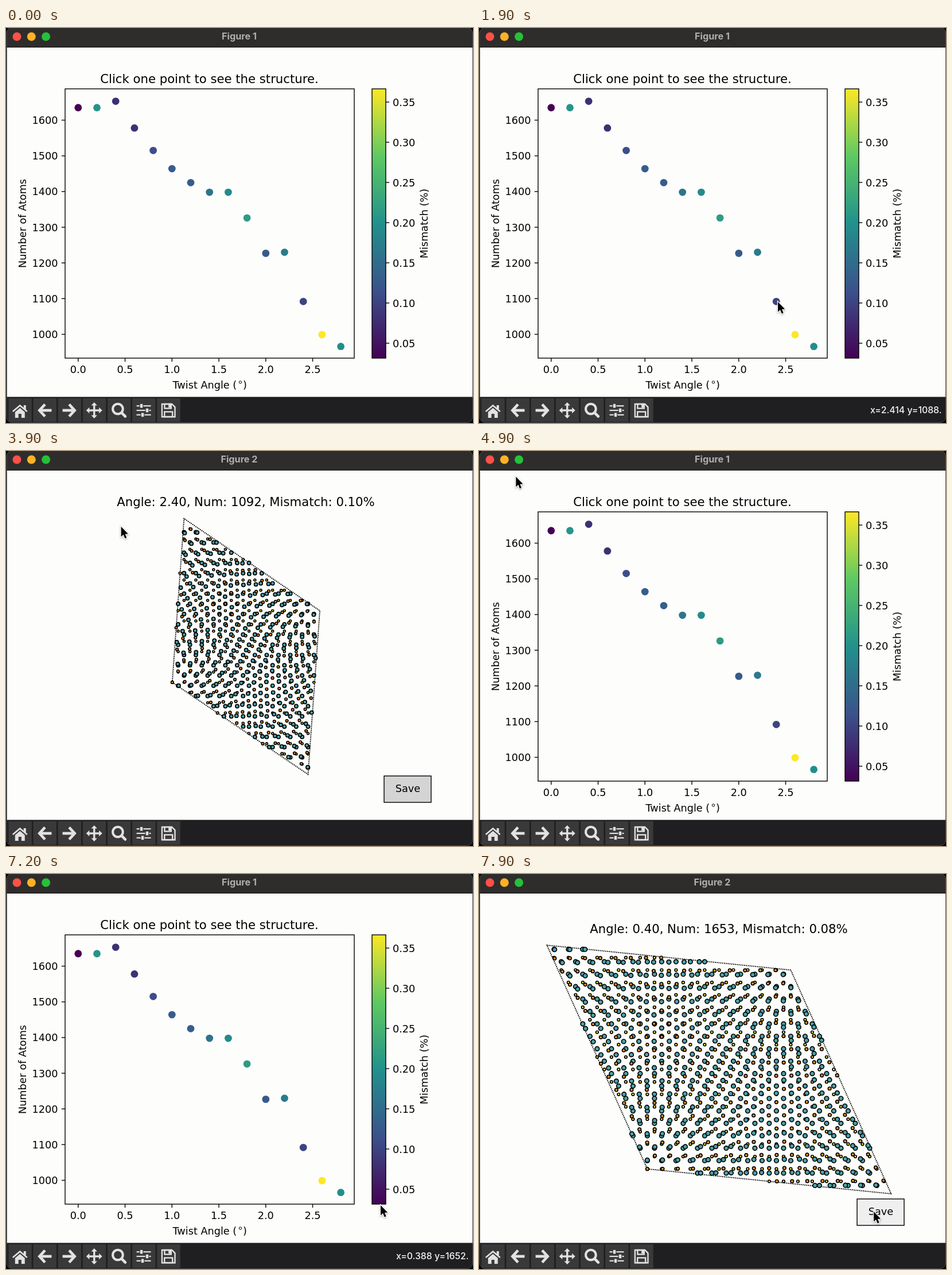
Write an HTML page with a canvas that moves like this. It is 814 by 688 pixels and loops after 8000 ms.

```html
<!DOCTYPE html>
<html lang="en">
<head>
<meta charset="utf-8">
<title>Twist angle explorer</title>
<style>
html, body { margin: 0; width: 100%; height: 100%; overflow: hidden; background: #000; }
canvas { display: block; }
</style>
</head>
<body>
<canvas id="stage" width="814" height="688"></canvas>
<script>
const ctx = document.getElementById('stage').getContext('2d');
const LOOP = 8000, TAU = 2 * Math.PI;
const PLOT = '"DejaVu Sans", sans-serif', UI = 'Inter, sans-serif';
const PT = 1.766, SMALL = 10 * PT, LARGE = 12 * PT;
const BOX = { x: 103, y: 106, w: 504, h: 469 };
const BAR = { x: 638, y: 106, w: 24, h: 469 };
const SAVE = { x: 659, y: 566, w: 82, h: 46 };
const ICON_COLOR = '#e2e2e2', BUTTON_COLOR = '#3a393a';

// Chart data, one value per 0.2 degrees
const ATOMS = [1635, 1635, 1653, 1578, 1515, 1464, 1425, 1398, 1398, 1326, 1227, 1230, 1092, 999, 966];
const MISMATCH = [.03, .205, .08, .08, .11, .13, .13, .16, .19, .215, .125, .17, .1, .367, .195];

// Cursor moves: start, end, destination; it rests in between
const MOVES = [[300, 1000, 520, 475], [2900, 3900, 200, 130], [3900, 4400, 16, 12], [4750, 5300, 188.7, 124.2],
  [5600, 6100, 452, 285], [6100, 6900, 652, 575], [7550, 7900, 687, 586]];

const lerp = (a, b, f) => a + (b - a) * f;
const clamp = f => Math.max(0, Math.min(1, f));
const within = (b, x, y) => x > b.x && x < b.x + b.w && y > b.y && y < b.y + b.h;
const xPix = v => 125.8 + 163.5 * v;
const yPix = n => 160.5 + (1600 - n) * .6217;

const SCALE = ['#440154', '#3b528b', '#21918c', '#5ec962', '#fde725'];
function scaleColor(f) {
  const s = clamp(f) * 4, i = Math.min(3, Math.floor(s));
  const channel = (hex, k) => parseInt(hex.slice(1 + 2 * k, 3 + 2 * k), 16);
  return `rgb(${[0, 1, 2].map(k => Math.round(lerp(channel(SCALE[i], k), channel(SCALE[i + 1], k), s - i)))})`;
}

// Two hexagonal layers sharing one supercell; each layer spans it with indices (m, n).
function makeCell(index, a, layers, titleY) {
  const [m, n] = layers[0], h = Math.sqrt(3) / 2;
  const A = [(m + n / 2) * a, n * h * a];
  const B = [-A[0] / 2 + A[1] * h, -A[0] * h - A[1] / 2];
  const at = (u, v) => [418.4, 340.5].map((c, k) => c + (u - .5) * A[k] + (v - .5) * B[k]);
  const inside = f => f > -1e-6 && f < 1 - 1e-6;
  const dots = [];
  layers.forEach(([m, n], layer) => {
    const N = m * m + m * n + n * n;
    for (const metal of [true, false]) {
      const size = metal ? .15 : layer ? .11 : .092;
      const color = metal ? '#4aa3a8' : layer ? '#f59a1e' : '#f4f43e';
      const shift = metal ? 1 / 3 : 0;
      for (let i = -40; i <= 40; i++) for (let j = -40; j <= 40; j++) {
        const p = i + shift, q = j + shift;
        const u = (p * (m + n) + q * n) / N, v = (p * n - q * m) / N;
        if (inside(u) && inside(v)) dots.push([...at(u, v), size * a, color]);
      }
    }
  });
  const title = `Angle: ${(index / 5).toFixed(2)}, Num: ${ATOMS[index]}, Mismatch: ${MISMATCH[index].toFixed(2)}%`;
  return { corners: [at(0, 0), at(1, 0), at(1, 1), at(0, 1)], dots, title, titleY };
}

const CELLS = [
  makeCell(12, 20.58, [[7, 9], [6, 9]], 96),
  makeCell(2, 25, [[16, 2], [15, 2]], 103)
];

function text(str, x, y, size, align = 'center', color = '#000', family = PLOT, weight = 400) {
  ctx.font = `${weight} ${size}px ${family}`;
  ctx.textAlign = align;
  ctx.fillStyle = color;
  ctx.fillText(str, x, Math.round(y));
}

function rect(x, y, w, h, color) {
  ctx.fillStyle = color;
  ctx.fillRect(x, y, w, h);
}

function frameRect({ x, y, w, h }, fill) {
  if (fill) rect(x, y, w, h, fill);
  ctx.lineWidth = 1.4;
  ctx.strokeRect(x, y, w, h);
}

function circle(x, y, r) {
  ctx.beginPath();
  ctx.arc(x, y, r, 0, TAU);
}

function disc(x, y, r, color) {
  circle(x, y, r);
  ctx.fillStyle = color;
  ctx.fill();
}

function ring(x, y, r, width) {
  circle(x, y, r);
  ctx.lineWidth = width;
  ctx.stroke();
}

function trace(points, closed) {
  ctx.beginPath();
  points.forEach(p => ctx.lineTo(...p));
  if (closed) ctx.closePath();
}

function line(width, ...points) {
  ctx.lineWidth = width;
  trace(points);
  ctx.stroke();
}

// Fills a shape given by its right half
function symmetric(...half) {
  trace([...half, ...half.map(([x, y]) => [-x, y]).reverse()], true);
  ctx.fill();
}

function upright(str, x, y) {
  ctx.save();
  ctx.translate(x, y);
  ctx.rotate(-TAU / 4);
  text(str, 0, 0, SMALL);
  ctx.restore();
}

// Toolbar icons, each around its own centre
function home() {
  line(2.6, [-12.5, 2], [0, -8.5], [12.5, 2]);
  ctx.fillRect(6.5, -9, 4, 7);
  symmetric([0, -4.3], [8.5, 3], [8.5, 13], [2.6, 13], [2.6, 6]);
}

const arrow = dir => () => {
  ctx.scale(dir, 1);
  line(4.8, [.5, -10.5], [-9, 0], [.5, 10.5]);
  line(4.8, [-8, 0], [12, 0]);
};

function move() {
  for (let i = 0; i < 4; i++) {
    line(3.4, [0, 0], [0, -10]);
    symmetric([0, -14], [5.2, -8.4]);
    ctx.rotate(TAU / 4);
  }
}

function zoom() {
  ring(-2, -2.5, 8.8, 4);
  ctx.lineCap = 'round';
  line(4.6, [5, 4.5], [11, 10.5]);
}

function sliders() {
  for (let i = -1; i <= 1; i++) {
    const x = i ? -3 + i : 6, y = i * 7.8;
    line(2.2, [-12.5, y], [12.5, y]);
    rect(x - 3.4, y - 3.6, 6.8, 7.2, BUTTON_COLOR);
    rect(x - 2.2, y - 3.3, 4.4, 6.6, ICON_COLOR);
  }
}

function floppy() {
  line(2.4, [-11.3, -11], [6, -11], [11.3, -5.7], [11.3, 11.2], [-11.3, 11.2], [-11.3, -12.2]);
  ctx.strokeRect(-6.8, -11, 11.4, 7.5);
  ctx.strokeRect(-7, 2.5, 14, 8.5);
  ctx.fillRect(0, -11, 4, 6);
}

const ICONS = [home, arrow(1), arrow(-1), move, zoom, sliders, floppy];

function drawWindow(title, dark) {
  rect(0, 0, 814, 688, '#000');
  ctx.beginPath();
  ctx.roundRect(1, -1, 812.5, 688.5, 10);
  ctx.save();
  ctx.clip();
  rect(0, 0, 814, 688, '#1f1e20');
  rect(0, 0, 814, 34, '#2e2d2c');
  rect(0, 33, 814, 1, '#111');
  if (!dark) rect(1.5, 34, 812, 608.5, '#fdfdfc');
  ctx.restore();
  ctx.lineWidth = 1;
  ctx.strokeStyle = '#4a494a';
  ctx.stroke();

  ['#ff5147', '#ffb224', '#25c138'].forEach((c, i) => disc(19 + 25.3 * i, 15, 7.5, c));
  text(title, 406.5, 20, 16.2, 'center', '#b0afaf', UI, 700);

  ICONS.forEach((icon, i) => {
    const x = 24.3 + 43.15 * i;
    rect(x - 20, 645, 40.5, 41, BUTTON_COLOR);
    ctx.save();
    ctx.translate(x, 666);
    ctx.fillStyle = ctx.strokeStyle = ICON_COLOR;
    icon();
    ctx.restore();
  });
}

function drawScatter() {
  text('Click one point to see the structure.', 354.5, 96, LARGE);
  ctx.strokeStyle = '#000';
  for (let n = 1000; n <= 1600; n += 100) {
    line(1.4, [BOX.x, yPix(n)], [BOX.x - 6.2, yPix(n)]);
    text(n, 90.5, yPix(n) + 6.6, SMALL, 'right');
  }
  for (let v = 0; v <= 2.5; v += .5) {
    const y = BOX.y + BOX.h;
    line(1.4, [xPix(v), y], [xPix(v), y + 6.2]);
    text(v.toFixed(1), xPix(v), 601, SMALL);
  }
  ATOMS.forEach((n, i) => disc(xPix(i / 5), yPix(n), 6.4, scaleColor((MISMATCH[i] - .031) / .336)));
  frameRect(BOX);

  text('Twist Angle (', 290.5, 628, SMALL, 'left');
  text(')', 420, 628, SMALL, 'right');
  ring(408.5, 617, 2.2, 1);
  upright('Number of Atoms', 35, 340.5);

  const fade = ctx.createLinearGradient(0, BAR.y + BAR.h, 0, BAR.y);
  SCALE.forEach((color, i) => fade.addColorStop(i / 4, color));
  frameRect(BAR, fade);
  for (let i = 1; i <= 7; i++) {
    const y = 619 - 70 * i;
    line(1.4, [662, y], [668.2, y]);
    text((i * .05).toFixed(2), 674, y + 6.6, SMALL, 'left');
  }
  upright('Mismatch (%)', 734.5, 340.5);
}

function drawCell(cell, hover) {
  text(cell.title, 418, cell.titleY, LARGE);
  ctx.strokeStyle = '#000';
  ctx.lineWidth = 1.8;
  ctx.setLineDash([1.8, 1.4]);
  trace(cell.corners, true);
  ctx.stroke();
  ctx.setLineDash([]);
  ctx.lineWidth = 1.7;
  for (const dot of cell.dots) {
    disc(...dot);
    ctx.stroke();
  }
  frameRect(SAVE, hover ? '#efefef' : '#d4d4d4');
  text('Save', 700.5, 594, SMALL);
}

function cursorAt(t) {
  if (t < MOVES[0][0]) return null;
  return MOVES.reduce(([x, y], [t0, t1, toX, toY]) => {
    const f = clamp((t - t0) / (t1 - t0));
    return [lerp(x, toX, f), lerp(y, toY, f)];
  }, [814, 560]);
}

function drawCursor([x, y]) {
  ctx.save();
  ctx.translate(x + 1, y + 2);
  trace([[0, 0], [0, 17.6], [4, 14], [6.7, 20.6], [9.7, 19.3], [7, 12.9], [12.2, 12.6]], true);
  ctx.shadowColor = 'rgba(0,0,0,.35)';
  ctx.shadowBlur = 3;
  ctx.shadowOffsetY = 1;
  ctx.lineWidth = 2.4;
  ctx.strokeStyle = '#fff';
  ctx.stroke();
  ctx.shadowColor = 'transparent';
  ctx.fillStyle = '#000';
  ctx.fill();
  ctx.restore();
}

// The readout freezes after the second click while the structure is computed.
function drawReadout(t) {
  const pos = cursorAt(Math.min(t, 5500));
  if (!pos) return;
  const x = pos[0] + .5, y = pos[1] + 4;
  if (!within(BOX, x, y)) return;
  const angle = (x - 125.8) / 163.5, atoms = 1600 - (y - 160.5) / .6217;
  text(`x=${angle.toFixed(3)} y=${atoms.toFixed(0)}.`, 806.5, 671, 15.8, 'right', '#f4f4f4', UI, 500);
}

function draw(t) {
  const first = t >= 2000 && t < 4700, second = t >= 7400;
  const dark = first ? t < 2100 : second && t < 7700;
  const cursor = cursorAt(t);
  drawWindow(first || second ? 'Figure 2' : 'Figure 1', dark);
  if (!first && !second) {
    drawScatter();
    drawReadout(t);
  } else if (!dark) {
    drawCell(CELLS[first ? 0 : 1], within(SAVE, ...cursor));
  }
  if (cursor) drawCursor(cursor);
}

const start = performance.now();
function frame() {
  draw((performance.now() - start) % LOOP);
  requestAnimationFrame(frame);
}
frame();
</script>
</body>
</html>
```
